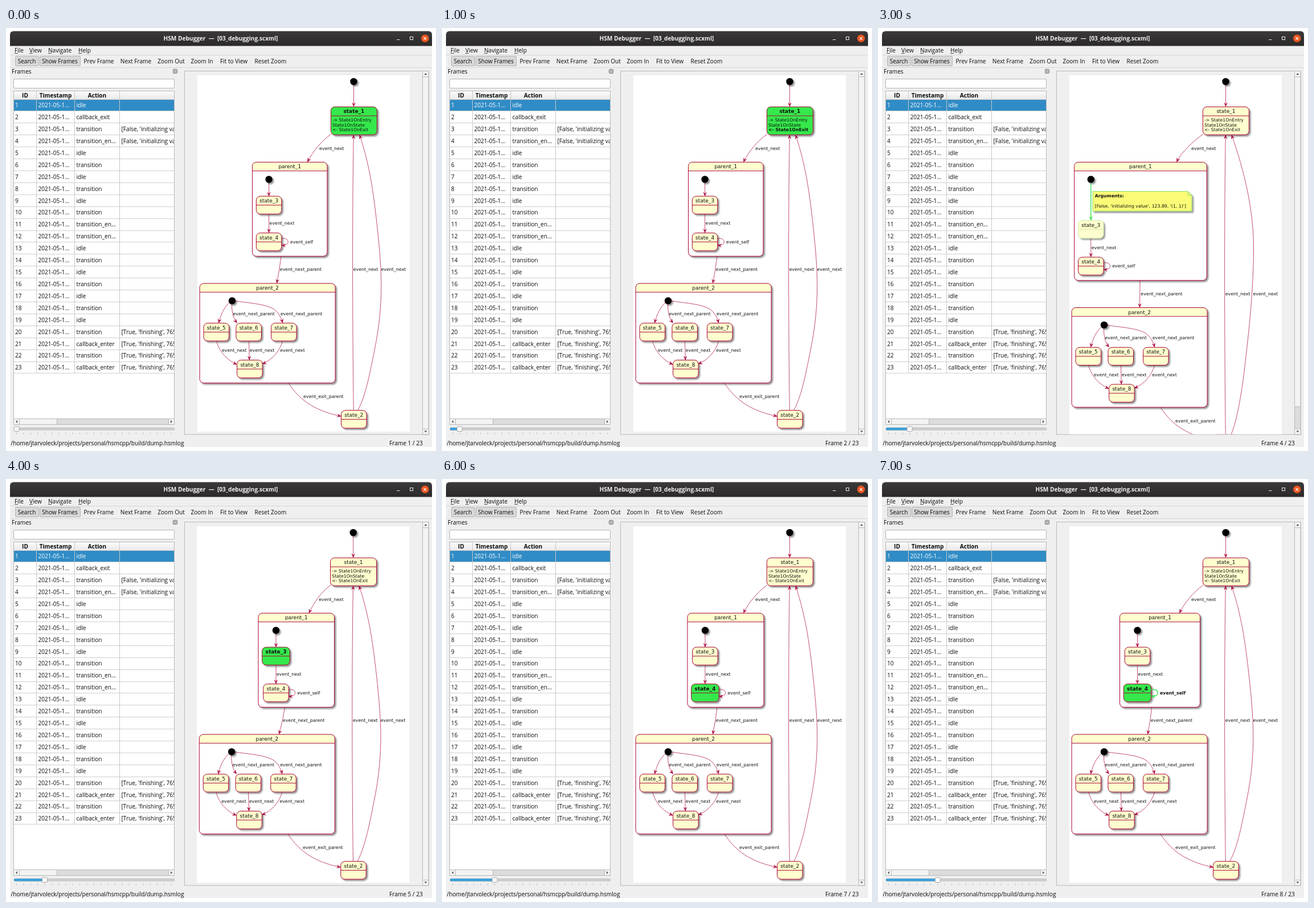
Write an HTML page that moves like this. It is 755 by 742 pixels and loops after 8 s.

```html
<!DOCTYPE html>
<html lang="en">
<head>
<meta charset="utf-8">
<title>HSM Debugger</title>
<style>
html, body { margin: 0; width: 100%; height: 100%; overflow: hidden; background: #fff; }
svg { display: block; width: 755px; height: 742px; }
text { white-space: pre; }
.ui { font: 500 10.1px "Open Sans", "Noto Sans", sans-serif; fill: #0c0c0c; }
.uml { font: 7.85px "DejaVu Sans", sans-serif; fill: #111; }
.b { font-weight: bold; }
.mid { text-anchor: middle; }
.name { font-size: 9px; }
.note { font-size: 7.78px; }
.edge { fill: none; stroke: #a80036; stroke-width: .7; marker-end: url(#red); }
.edge.hot { stroke: #32e048; stroke-width: 1.3; marker-end: url(#green); }
</style>
</head>
<body>
<svg id="stage" viewBox="0 0 755 742" xmlns="http://www.w3.org/2000/svg"></svg>
<script>
const STEP = 1000, RED = '#a80036', GREEN = '#34e84b', CREAM = '#fefece';
const LOW = 43;

const rect = (x, y, w, h, fill, stroke = 'none', rx = 0, more = '') =>
  `<rect x="${x}" y="${y}" width="${w}" height="${h}" rx="${rx}" fill="${fill}" stroke="${stroke}" ${more}/>`;
const path = (d, stroke, w = 1, fill = 'none', more = '') =>
  `<path d="${d}" stroke="${stroke}" stroke-width="${w}" fill="${fill}" ${more}/>`;
const text = (x, y, s, cls = '', more = '') =>
  `<text x="${x}" y="${y}" class="${cls}" ${more}>${s.replace(/</g, '&lt;')}</text>`;
const edge = (d, hot) => `<path class="edge${hot ? ' hot' : ''}" d="${d}"/>`;
const at = (dx, dy, body) => `<g transform="translate(${dx} ${dy})">${body}</g>`;

const DEFS = `<defs>
  ${[['red', RED], ['green', '#32e048']].map(([id, c]) =>
    `<marker id="${id}" markerUnits="userSpaceOnUse" markerWidth="8" markerHeight="8" refX="6.2" refY="3" orient="auto" overflow="visible">
      <path d="M6.2 3 L0 .3 L2.6 3 L0 5.7 Z" fill="${c}" stroke="${c}" stroke-width=".5"/></marker>`).join('')}
  <filter id="shadow" x="-20%" y="-20%" width="150%" height="150%">
    <feDropShadow dx="2.6" dy="2.6" stdDeviation="1" flood-color="#000" flood-opacity=".42"/></filter>
  <linearGradient id="bar" x2="0" y2="1"><stop stop-color="#3b393a"/><stop offset="1" stop-color="#2b2929"/></linearGradient>
  <linearGradient id="head" x2="0" y2="1"><stop stop-color="#fbfbfb"/><stop offset="1" stop-color="#e9e9e9"/></linearGradient>
  <clipPath id="view"><rect x="314" y="76.5" width="417" height="636"/></clipPath>
  <clipPath id="table"><rect x="13" y="110" width="283" height="576"/></clipPath>
</defs>`;

// ---------- window ----------

function titleBar() {
  return path('M7 31.5 V12 Q7 5.5 13.5 5.5 H741.5 Q748 5.5 748 12 V31.5 Z', 'none', 0, 'url(#bar)') +
    text(377, 22, 'HSM Debugger\u00a0 — \u00a0[03_debugging.scxml]', 'b mid', 'fill="#f4f2f0"') +
    path('M686 20.5 H691.5', '#eee') + rect(709.5, 15.5, 5, 5, 'none', '#eee') +
    '<circle cx="735.7" cy="18.3" r="6.8" fill="#e95420"/>' +
    path('M733.2 15.8 l5 5 m0 -5 l-5 5', '#fff', 1.1);
}

function menus() {
  const menu = [[15, 'File'], [41, 'View'], [74, 'Navigate'], [127, 'Help']];
  const tools = [[36.5, 'Search'], [94.5, 'Show Frames'], [163, 'Prev Frame'], [228, 'Next Frame'],
    [290, 'Zoom Out'], [344, 'Zoom In'], [400, 'Fit to View'], [464.5, 'Reset Zoom']];
  return menu.map(([x, s]) => text(x, 43, s) + path(`M${x} 44.5 h6`, '#222', .8)).join('') +
    path('M7 47.5 H748 M7 69.5 H748', '#d6d6d6') +
    path('M12 54 V64', '#bbb', 1, 'none', 'stroke-dasharray="1 2"') +
    rect(16.5, 49.5, 41, 17, '#d8d8d8', '#b4b4b4', 1.5) + rect(59.5, 49.5, 71, 17, '#d8d8d8', '#b4b4b4', 1.5) +
    tools.map(([x, s]) => text(x, 62, s, 'mid')).join('');
}

function actionOf(id) {
  if (id === 2) return 'callback_exit';
  if (id === 21 || id === 23) return 'callback_enter';
  if ([4, 11, 12].includes(id)) return 'transition_en…';
  return id === 3 || id % 2 === 0 ? 'transition' : 'idle';
}

function argsOf(id) {
  if (id === 3 || id === 4) return "[False, 'initializing value', 123.89]";
  return id > 19 ? "[True, 'finishing', 765.12]" : '';
}

function table() {
  const pitch = 20.91, top = 125.5, cols = [53.5, 120.5, 199.5];
  let s = rect(13.5, 110.5, 282.5, 585, '#fff', '#b8b8b8') +
    rect(14, 111, 282, 14.5, 'url(#head)') + rect(14, 125.5, 282, 20.4, '#308cc6');
  for (let i = 1; i <= 23; i++) {
    const y = top + (i - 1) * pitch, base = y + 13.8, fill = i === 1 ? 'fill="#fff"' : '';
    s += path(`M14 ${Math.round(y + pitch) - .5} H296`, '#cfcfcf') +
      text(16, base, '' + i, '', fill) + text(56.5, base, '2021-05-1…', '', fill) +
      text(123.5, base, actionOf(i), '', fill) + text(202.5, base, argsOf(i));
  }
  s += cols.map(x => path(`M${x} 111 V606`, '#c8c8c8')).join('') + path('M14 125.5 H296', '#c4c4c4') +
    [[33.5, 'ID'], [87, 'Timestamp'], [160, 'Action']].map(([x, h]) => text(x, 122, h, 'b mid')).join('');
  return `<g clip-path="url(#table)">${s}</g>`;
}

function leftPane() {
  let ticks = '';
  for (let i = 0; i < 23; i++) ticks += `M${(18.5 + i * 12.35).toFixed(1)} 710 v2.5`;
  return text(10, 79.5, 'Frames') +
    rect(293.5, 72.5, 7, 7, 'none', '#666', 1.5) + rect(295.5, 74.5, 3, 3, 'none', '#666', 0, 'stroke-width=".8"') +
    rect(13.5, 89.5, 282, 16, '#fff', '#b4b4b4', 1.5) + table() +
    path('M13.5 110.5 V695.5 H295.5 V110.5 Z', '#b8b8b8') +
    rect(13.5, 685.5, 282, 10, '#dcdcdc', '#b8b8b8') + rect(13.5, 685.5, 10, 10, '#f4f4f4', '#b8b8b8') +
    rect(285.5, 685.5, 10, 10, '#f4f4f4', '#b8b8b8') + rect(23.5, 685.5, 66, 10, '#f3f3f3', '#b8b8b8') +
    path('M20 688 v5 l-3 -2.5 Z M289 688 v5 l3 -2.5 Z', 'none', 0, '#555') +
    path(ticks, '#b0b0b0') + path('M305 391 V403', '#d0d0d0', 1, 'none', 'stroke-dasharray="1 2"');
}

function windowFrame() {
  return rect(7, 20, 741, 715, '#efefef') + titleBar() + menus() + leftPane() +
    text(8.5, 732, '/home/jtarvoleck/projects/personal/hsmcpp/build/dump.hsmlog') +
    rect(313.5, 75.5, 428.5, 637.5, '#efefef', '#b8b8b8');
}

// ---------- diagram ----------

const dot = (x, y) => `<circle cx="${x}" cy="${y}" r="6.2" fill="#000" filter="url(#shadow)"/>`;

// mode: 'on' = active, 'next' = about to be entered
function box(cx, y, w, h, head, name, mode, body) {
  const x = cx - w / 2, on = mode === 'on', next = mode === 'next';
  const line = next ? '#a9e58e' : RED, dash = next ? 'stroke-dasharray="1.6 1"' : '';
  const fill = on ? GREEN : CREAM, r = 7;
  return `<g filter="url(#shadow)">` + rect(x, y, w, h, body || fill, 'none', r) +
    path(`M${x} ${y + head} V${y + r} q0 ${-r} ${r} ${-r} H${x + w - r} q${r} 0 ${r} ${r} V${y + head} Z`, 'none', 0, fill) +
    rect(x, y, w, h, 'none', line, r, dash) + '</g>' +
    path(`M${x} ${y + head} h${w}`, line, .95, 'none', dash) +
    text(cx, y + 11, name, 'mid name' + (on ? ' b' : ''));
}

const state = (cx, y, name, mode) => box(cx, y, mode === 'on' ? 48.5 : 44.5, 31.3, 15.7, name, mode);

function note(x, y) {
  const w = 174, h = 34.7, f = 7, line = '#7fdc6c';
  return path(`M${x} ${y} h${w - f} l${f} ${f} v${h - f} h${-w} Z`, line, .9, '#fbfb77', 'filter="url(#shadow)"') +
    path(`M${x + w - f} ${y} v${f} h${f}`, line, .9) +
    text(x + 3.7, y + 10, 'Arguments:', 'note b') +
    text(x + 3.7, y + 28.5, "[False, 'initializing value', 123.89, '(1, 1)']", 'note');
}

function firstState({ on, exit }) {
  return dot(610.5, 94) + edge('M610.5 100 V137.5') +
    box(610.9, 138.3, 81, 49, 15.8, 'state_1', on === 1 ? 'on' : '') +
    text(573, 164.3, '-> State1OnEntry', 'note') + text(573, 172.8, 'State1OnState', 'note') +
    text(573, 181.3, '<- State1OnExit', 'note' + (exit ? ' b' : ''));
}

// Edges hanging between state_1 and state_2; the outer one bends higher in the tall layout
function rightSide({ low }) {
  const outer = low
    ? 'M620 713 C630 690 639 640 645 585 C652 525 659 460 659.5 390 C660 320 643 250 621 188'
    : 'M618 670 C632 645 640 600 648 560 C664 480 659 420 653 360 C646 295 640 245 621 188';
  return edge(`M496 ${623 + low} C517 ${655 + low} 545 ${672 + low} 588 ${681 + low}`) +
    text(522, 649 + low, 'event_exit_parent') +
    edge(`M610.3 ${670 + low} C609 ${590 + low} 607.3 350 610.3 188`) +
    text(609.8, 426 + low, 'event_next') +
    edge(outer) + text(658.5, 426 + low, 'event_next') +
    state(610.8, 670.7 + low, 'state_2');
}

function parentOne({ p: [x, w], py, low, c, on, go }) {
  const y = 235.3 + py, dy = low, s4 = on === 4 ? 2 : 0, self = go === 'self', nxt = go === 'next';
  const e = c + 22.3 + s4;
  return box(x + w / 2, y, w, 165 + low - py, 15.4, 'parent_1', go === 'parent' ? 'next' : '', '#fff') +
    dot(c, 265.5 + py) + edge(`M${c} ${272 + py} V${294.5 + dy}`, go === 'init') +
    state(c, 295 + dy, 'state_3', on === 3 ? 'on' : go === 'init' ? 'next' : '') +
    edge(`M${c} ${326.5 + dy} V${358.8 + dy}`, nxt) + text(c + 1, 345 + dy, 'event_next', nxt ? 'b' : '') +
    state(c, 359.5 + dy, 'state_4', on === 4 ? 'on' : nxt ? 'next' : '') +
    edge(`M${e} ${369.5 + dy} C${e + 7} ${368 + dy} ${e + 11.3} ${371 + dy} ${e + 11.3} ${375 + dy} C${e + 11.3} ${379.5 + dy} ${e + 7} ${381.7 + dy} ${e + .3} ${381 + dy}`, self) +
    text(e + 15.2, 377.5 + dy, 'event_self', self ? 'b' : '');
}

function parentTwo() {
  const ev = 'event_next', evp = 'event_next_parent';
  return box(459.1, 448, 238, 174.7, 15.4, 'parent_2', '', '#fff') + dot(397, 478.5) +
    edge('M392 482 C383 490 377 503 373.5 517') +
    edge('M396.5 485 C396.5 497 398 508 405.5 517') +
    edge('M403 479 C425 482 450 484 464 490 C475 494 482 504 485.7 517') +
    text(398.5, 503.5, evp) + text(482, 503.5, evp) +
    state(369.3, 517.7, 'state_5') + state(426.2, 517.7, 'state_6') + state(487.8, 517.7, 'state_7') +
    edge('M370 549.5 C373 564 385 581 405 590') + edge('M426.5 549.5 L427.3 582') +
    edge('M485.5 549.5 C481 566 468 582 450.5 589') +
    text(379, 568, ev) + text(427.8, 568, ev) + text(481.2, 568, ev) +
    state(427.9, 582.5, 'state_8');
}

function entry({ r, tip, go }) {
  if (go === 'parent')
    return edge('M572 166 C520 171 455 180 424 197 C403 209 397 235 398 278', true) +
      text(506.5, 213.5, 'event_next', 'b mid') + note(418, 219.7);
  return edge(`M${571 + r} 186 C${553 + r} 199 ${tip + 9} 217 ${tip} 234.7`) + text(550 + r, 213.5, 'event_next');
}

function diagram(v) {
  const { r, l, low, page, pp: [a, b] } = v;
  return `<g class="uml" clip-path="url(#view)">` + rect(page[0], 83, page[1], 625 + low, '#fff') +
    parentOne(v) + at(l, low, parentTwo()) + at(r, 0, firstState(v) + rightSide(v)) + entry(v) +
    edge(`M${a} ${400.5 + low} Q${(a + b) / 2 + (a - b) / 7} ${425 + low} ${b} ${447.3 + low}`) +
    text((a + b) / 2 + 1.6, 426 + low, 'event_next_parent') +
    (v.go === 'init' ? note(377, 286.5) : '') + '</g>';
}

function controls(n, low) {
  const x = 18.5 + 12.35 * n, end = low ? 664.5 : 703.5;
  return rect(731.5, 75.5, 10.5, 637.5, '#dcdcdc', '#b8b8b8') +
    rect(731.5, 75.5, 10.5, 10, '#f4f4f4', '#b8b8b8') + rect(731.5, 703, 10.5, 10, '#f4f4f4', '#b8b8b8') +
    rect(731.5, 85.5, 10.5, end - 85.5, '#f3f3f3', '#b8b8b8') +
    path('M734.3 82 h5 l-2.5 -3 Z M734.3 706.5 h5 l-2.5 3 Z', 'none', 0, '#555') +
    rect(14.5, 701.5, 281, 3.5, '#d4d4d4', '#b4b4b4', 1) +
    (n ? rect(14.5, 701.5, x - 14.5, 3.5, '#3daee9', '#2f7fb4', 1) : '') +
    rect(x - 4.5, 699, 9, 8.5, '#f8f8f8', '#a8a8a8', 1.5) +
    text(673, 732, `Frame ${n + 1} / 23`);
}

// r, l: sideways shift of the right and left parts; low, py: drop of the lower part and of parent_1
const plain = { r: 0, l: 0, low: 0, py: 0, p: [432.5, 131.5], c: 461.6, tip: 529.5, page: [336, 373], pp: [483, 475.5] };
const steps = [
  { on: 1 },
  { on: 1, exit: true },
  { go: 'parent', r: 2.7, l: -3, low: LOW, py: LOW, p: [357, 131.5], c: 386, page: [333, 378], pp: [435, 442] },
  { go: 'init', low: LOW - .5, p: [344.7, 232.5], c: 373.8, tip: 524.5, pp: [460, 459.5] },
  { on: 3, r: -.8, l: -.8, p: [443, 133.5], c: 474, tip: 532, page: [335, 373.5], pp: [489.5, 479.5] },
  { go: 'next' },
  { on: 4, p: [431, 134], c: 462 },
  { on: 4, go: 'self', p: [424.5, 141], c: 455.5, pp: [480.7, 473.7] }
].map(s => ({ ...plain, ...s }));

const stage = document.getElementById('stage');
stage.innerHTML = DEFS + `<g class="ui">${windowFrame()}</g>` +
  steps.map((v, i) => `<g class="step" display="none">${diagram(v)}<g class="ui">${controls(i, v.low)}</g></g>`).join('');

const layers = [...stage.querySelectorAll('.step')];
const start = performance.now();
let shown = -1;
function tick() {
  const i = Math.floor(Math.max(0, performance.now() - start) / STEP) % layers.length;
  if (i !== shown) {
    layers.forEach((g, k) => g.setAttribute('display', k === i ? 'inline' : 'none'));
    shown = i;
  }
  requestAnimationFrame(tick);
}
tick();
</script>
</body>
</html>
```
